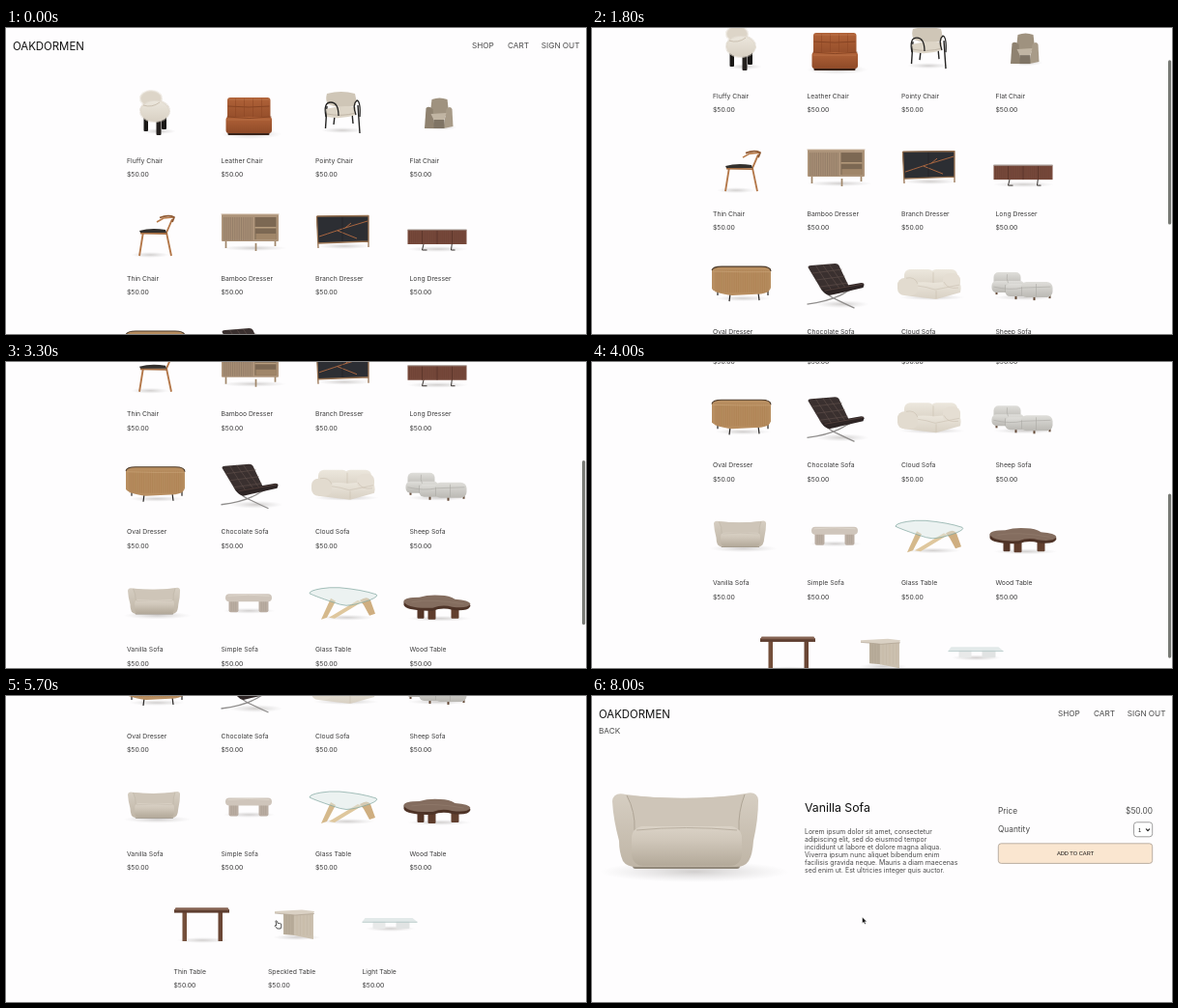
These frames come from a looping animation (600x317 px, 8100 ms). An HTML page:

```html
<!DOCTYPE html>
<html lang="en">
<head>
<meta charset="utf-8">
<title>Furniture shop</title>
<style>
html, body { margin: 0; width: 100%; height: 100%; overflow: hidden; background: #fefdfe; }
svg { display: block; width: 100vw; height: 100vh; }
text { font-family: Inter, sans-serif; fill: #4a4a4a; white-space: pre; }
.logo { font-size: 11.4px; fill: #111; }
.nav { font-size: 8.2px; }
.label { font-size: 6.8px; fill: #3c3c3c; }
.title { font-size: 12.3px; fill: #111; }
.copy { font-size: 6.93px; }
.field { font-size: 8.3px; }
.button { font: 5.7px "Liberation Sans", sans-serif; fill: #111; }
</style>
</head>
<body>
<svg id="stage" viewBox="0 0 600 317">
  <defs>
    <linearGradient id="linen" x2="0" y2="1"><stop stop-color="#d6cec2"/><stop offset="1" stop-color="#bfb5a6"/></linearGradient>
    <linearGradient id="seat" x2="0" y2="1"><stop stop-color="#dad2c6"/><stop offset=".35" stop-color="#d0c7ba"/><stop offset="1" stop-color="#b3a999"/></linearGradient>
    <linearGradient id="hide" x2="0" y2="1"><stop stop-color="#b06238"/><stop offset="1" stop-color="#8f4a28"/></linearGradient>
    <linearGradient id="boucle" x2="0" y2="1"><stop stop-color="#ece7dd"/><stop offset="1" stop-color="#d8d0c3"/></linearGradient>
    <linearGradient id="fleece" x2="0" y2="1"><stop stop-color="#dfdeda"/><stop offset="1" stop-color="#bab8b3"/></linearGradient>
    <radialGradient id="shade"><stop stop-color="#8d8884" stop-opacity=".4"/><stop offset="1" stop-color="#aaa" stop-opacity="0"/></radialGradient>
  </defs>
  <g id="shop"></g>
  <g id="detail"></g>
  <rect id="bar" x="596" width="3.2" height="170.3" rx="1.6" fill="#777974"/>
  <path id="arrow" d="M0 0V6.6L1.6 5.2L2.7 7.6L3.8 7.1L2.8 4.8H4.8Z" fill="#111" stroke="#fff" stroke-width=".5"/>
  <path id="hand" d="M-.6 .2Q.2 -.6 .9 .4L1.8 2.6Q2.5 1.9 3 2.5Q3.8 2 4.2 2.8Q5.2 2.6 5.3 3.8Q5.6 6.4 4.6 8H1Q.2 6.6 -1.4 5.2Q-1.2 4 .4 4.5Z" fill="#fff" stroke="#222" stroke-width=".8"/>
</svg>
<script>
const LOOP = 8100, STEP = 100, OPEN = 7000;
const $ = id => document.getElementById(id);

const fill = (d, color, extra = '') => `<path d="${d}" fill="${color}" ${extra}/>`;
const line = (d, color, width = 1) =>
  `<path d="${d}" fill="none" stroke="${color}" stroke-width="${width}" stroke-linejoin="round"/>`;
const box = (x, y, w, h, color, r = 0, extra = '') =>
  `<rect x="${x}" y="${y}" width="${w}" height="${h}" rx="${r}" fill="${color}" ${extra}/>`;
const oval = (x, y, rx, ry, color, extra = '') =>
  `<ellipse cx="${x}" cy="${y}" rx="${rx}" ry="${ry}" fill="${color}" ${extra}/>`;
const shade = (x, y, rx, ry = 3) => oval(x, y, rx, ry, 'url(#shade)');
const text = (x, y, kind, str, anchor = 'start') =>
  `<text x="${x}" y="${y}" class="${kind}" text-anchor="${anchor}">${str}</text>`;
const slats = (from, to, gap, top, bottom, color, width = .5) => {
  let d = '';
  for (let x = from; x <= to; x += gap) d += `M${x} ${top}V${bottom}`;
  return line(d, color, width);
};

const sofa = shade(106, 182, 98, 11) +
  box(42, 172, 111, 7, '#91887a', 3) +
  fill('M21 109Q22 99 35 102Q65 106 97 106Q130 106 159 101Q171 98 172 108Q172 128 167 150Q166 165 162 171Q158 177 149 177H46Q36 177 32 171Q28 162 28 150Q22 128 21 109Z', 'url(#linen)') +
  fill('M36 103Q97 109 158 102Q152 118 152 137H44Q44 118 36 103Z', '#cec5b8') +
  line('M36 103Q45 120 44 139M158 102Q151 120 152 139', '#afa596', 1) +
  box(41, 135, 114, 41, 'url(#seat)', 12) +
  line('M46 139Q97 134 150 139', '#b0a697', .8);

const glassTop = 'M-6 79Q-6 76 6 74Q14 72.5 25 73Q48 75 63 80Q66 82 56 86Q42 91 32 91.5Q26 91 18 88Q0 82 -6 79Z';

// Each drawing uses coordinates from the left edge of its cell.
const art = {
  'Fluffy Chair': () => shade(33, 107, 18) +
    box(17.5, 92, 4.5, 15, '#191716', 1) + box(36, 92, 5, 13, '#191716', 1) + box(30.5, 94, 5, 17, '#24201e', 1) +
    oval(25, 73, 11, 8, '#ddd5c8', 'stroke="#e8e2d8" stroke-width="2" stroke-dasharray=".6 .5"') +
    oval(29, 86, 15, 11, 'url(#boucle)', 'stroke="#ddd5c9" stroke-width="2" stroke-dasharray=".6 .5"') +
    line('M17 80Q26 83 34 77', '#c3b8a8', .8),
  'Leather Chair': () => shade(31, 110, 32, 5) +
    box(7, 107, 43, 4, '#3a241a', 1) +
    box(6.5, 72, 44.5, 26, 'url(#hide)', 3) + box(5, 92, 47.5, 17, 'url(#hide)', 3) +
    line('M7 81Q29 83 50 81M6 92Q29 95 52 92', '#7f3f20', .8) + slats(15, 44, 9, 73, 92, '#8a4523') +
    line('M8 74H50M6 95H51', '#c27a50', .6),
  'Pointy Chair': () => shade(28, 106, 22) +
    line('M12 81L10.5 104M44 80L46 109M20 91L19 100M38 88L39 99', '#242322', 1.4) +
    fill('M12 68Q27 64 41 68Q43 74 42 80Q27 85 13 79Q10 74 12 68Z', '#cfc6b7') +
    fill('M11 84Q28 79 42 82V90Q27 95 12 92Z', '#ddd5c7') + line('M12 89Q27 92 42 88', '#b5aa9a', .7) +
    line('M11 92Q8 77 16 77Q24 77 24 91M42 90Q38 79 43 75Q47 76 46 92', '#242322', 1.3),
  'Flat Chair': () => shade(31, 103, 18) +
    fill('M23 74Q31 71 39 74L41 91H21Z', '#9f927f') +
    fill('M17 83Q20 80 24 84L26 104H15.5Z', '#8f8270') + fill('M38 84Q42 80 44 84L45 102L35 104Z', '#a89b88') +
    fill('M22 89L38 88L36 95H25Z', '#c1b5a3') + fill('M25 95H36V104H25Z', '#7f7465'),
  'Thin Chair': () => shade(24, 113, 20) +
    line('M17 89L13 114M46 114L41 90L47 76', '#b4784a', 1.9) +
    line('M14 90.5L42 91', '#a56c40', 1.8) + fill('M13 88Q25 84.5 40 87L41 90H14Z', '#33302d') +
    line('M31 79L38 75L48 74', '#b87b4a', 1.6) + line('M34 74.5Q43 71 49 74L47 79', '#8f5a34', 1.8),
  'Bamboo Dresser': () => shade(34, 106, 34) +
    line('M5 98V106M36 101V109M56 97V104', '#a08669', 1.7) +
    box(.5, 71, 59, 28, '#ad947a', 1) + box(35, 74, 22, 23, '#7c6853') + box(35, 84, 22, 1.5, '#b79d7e') +
    box(36, 91, 21, 6, '#a08669') + slats(3, 33, 1.8, 74, 98, '#8a7460', .7) + line('M0 71H60', '#c4ae95', 1),
  'Branch Dresser': () => shade(30, 104, 28) +
    fill('M1 73L55 72V99L3 101Z', '#2c2e33') + line('M1.5 73L55 72.5V105M3 101L55 99M1.5 73L3 106', '#96704f', 1.3) +
    line('M4 94Q22 88 31 85L54 78M23 88L43 96M31 85L37 80', '#b66c42', .9) + line('M28 74V99', '#1c1e21', .5),
  'Long Dresser': () => shade(29, 107, 32) +
    line('M15 100L13 108H18M44 100L43 108H47', '#37312e', 1) +
    box(-2, 87, 61, 15, '#77493b') + slats(0, 58, 2.1, 88, 101, '#683f33', .5) +
    line('M-2 87H59', '#a49a94', 1.2) + slats(13, 45, 15.5, 88, 102, '#4d2c23', .6),
  'Oval Dresser': () => shade(31, 103, 29) +
    line('M18 98L17 106M47 97L48 105M5 95V100M57 95V100', '#262321', 1.2) +
    fill('M-1 74Q0 70 9 70H50Q60 70 60 75V92Q59 97 50 98.5L20 100Q2 98 -1 93Z', '#b88e60') +
    slats(3, 58, 1.8, 74, 97, '#a67b4d') + line('M-1 74Q0 70 9 70H50Q60 70 60 75', '#4d3b2b', 1.1) +
    line('M0 75Q30 76 60 75.5', '#cda87d', .6),
  'Chocolate Sofa': () => shade(36, 109, 28, 4) +
    line('M0 109Q26 106 41 96Q50 91 57 89M17 94Q22 101 32 105Q40 109 49 113', '#8f8d8c', 1.3) +
    fill('M1 71Q1 69 4 69L29 67Q32 67 33 69L43 90L17 96Q14 94 13 91Z', '#3a302f') +
    fill('M15 94L56 87Q59 87 59 89L58 92L23 100Q18 99 15 94Z', '#2e2525') +
    line('M9 69L25 94M16 68L33 92M23 68L39 91M5 77L36 73M9 84L39 80M13 91L42 87', '#62514c', .6) +
    line('M18 95L58 88', '#58453f', .8),
  'Cloud Sofa': () => shade(32, 102, 34) +
    box(3, 73, 31, 20, 'url(#boucle)', 6) + box(30, 73, 28, 19, 'url(#boucle)', 6) +
    fill('M2 88Q20 85 34 87L58 85Q63 88 61 97L36 104L3 100Z', 'url(#boucle)') +
    box(-4, 82, 21, 18, '#e2dbcf', 7) + box(43, 77, 18, 17, '#e5ded3', 7) +
    line('M17 90Q26 91 35 94L60 89M36 95V103M33 76V87M5 82Q14 80 17 88M44 86Q48 94 59 92', '#c9bfb1', .6),
  'Sheep Sofa': () => shade(30, 102, 32) +
    box(0, 95, 2, 4, '#654b38') + box(20, 100, 2, 4, '#654b38') + box(39, 101, 2, 4, '#654b38') + box(55, 99, 2, 4, '#654b38') +
    box(-2, 76, 28, 14, 'url(#fleece)', 5) + box(-4, 85, 34, 12, 'url(#fleece)', 5) +
    box(10, 88, 30, 13, 'url(#fleece)', 5) + box(26, 86, 33, 16, 'url(#fleece)', 6) +
    line('M-2 91Q15 95 28 92L57 91M10 89V97M27 91V100M42 88V101M12 78Q11 83 13 87', '#aaa8a3', .6),
  'Vanilla Sofa': () => `<g transform="translate(-6.5 37.8) scale(.358 .352)">${sofa}</g>`,
  'Simple Sofa': () => shade(29, 97, 27) +
    box(8, 85, 10, 13.5, '#baada2', 2) + box(39, 85, 10, 13.5, '#baada2', 2) +
    slats(11, 15, 2, 87, 97, '#ab9e92') + slats(42, 46, 2, 87, 97, '#ab9e92') +
    box(4.5, 79.5, 48, 8, '#cfc5bb', 4) + line('M7 81.5Q28 79.5 50 81.5', '#e0d8cf', .8),
  'Glass Table': () => shade(33, 104, 28) +
    fill('M6 106L16 84L21 87L12 104Z', '#d5b98c') + fill('M14 104L44 86L48 88L20 105Z', '#dfc79d') +
    fill('M46 86Q54 81 57 86L62 100L56 102L50 91Z', '#cfae80') +
    fill(glassTop, '#dbe8e5', 'fill-opacity=".5"') + line(glassTop, '#7fa59e', .7),
  'Wood Table': () => shade(31, 105, 33) +
    box(8, 93, 7, 12, '#543527', 1) + box(19, 93, 8, 13, '#5e3c2c', 1) + box(43, 92, 8, 13, '#62402f', 1) +
    fill('M-6 88Q-6 84 10 84Q20 81 32 82Q42 82 47 86Q62 87 63 92Q61 98 44 96Q34 93 24 97Q-4 97 -6 91Z', '#4e3327') +
    fill('M-6 87Q-5 83 10 83Q20 80 32 81Q41 81 47 85Q62 86 63 90Q60 95 44 93Q34 90 24 94Q-4 95 -6 87Z', '#846d5f') +
    line('M2 88Q22 84 56 90', '#927c6e', .6),
  'Thin Table': () => shade(30, 105, 27) +
    box(9, 76, 4.5, 30, '#744f3b') + box(46, 76, 4.5, 30, '#6a4635') +
    box(.5, 73, 57, 3.6, '#5d3d2f') + fill('M2 71.3H56L57.5 74H.5Z', '#856353'),
  'Speckled Table': () => shade(30, 102, 25) +
    fill('M16 77H28V100L16 99Z', '#b9ad9b') + fill('M27 77L47 76V104L27 100Z', '#cbc0af') +
    slats(30, 45, 3.5, 79, 100, '#c1b5a3', .5) + slats(19, 26, 3, 79, 99, '#aa9e8c', .5) +
    fill('M7 75L35 73.5L48 75L47 77.5L28 79L7 77Z', '#dad1c4') + line('M7 77L28 79L48 77.5', '#a99d8b', .6),
  'Light Table': () => shade(29, 93, 26) +
    box(11, 85, 13, 8, '#e8e9e9', 1) + box(35, 85, 14, 8, '#e1e3e3', 1) +
    fill('M3 82H52L57 86H0Z', '#dde6e6', 'fill-opacity=".85"') + line('M0 86.3H57', '#b6c9c8', .9)
};

const header = text(7, 22.5, 'logo', 'OAKDORMEN') + text(482, 21.4, 'nav', 'SHOP') +
  text(519, 21.4, 'nav', 'CART') + text(593.5, 21.4, 'nav', 'SIGN OUT', 'end');

$('shop').innerHTML = header + Object.entries(art).map(([name, draw], i) => {
  const row = i >> 2, x = (row === 4 ? 173.5 : 125) + i % 4 * 97.5;
  return `<g transform="translate(${x} ${row * 122})">${draw()}` +
    text(0, 139.6, 'label', name) + text(0, 154.3, 'label', '$50.00') + '</g>';
}).join('');

const copy = [
  'Lorem ipsum dolor sit amet, consectetur',
  'adipiscing elit, sed do eiusmod tempor',
  'incididunt ut labore et dolore magna aliqua.',
  'Viverra ipsum nunc aliquet bibendum enim',
  'facilisis gravida neque. Mauris a diam maecenas',
  'sed enim ut. Est ultricies integer quis auctor.'
];
$('detail').innerHTML = header + text(7, 39, 'nav', 'BACK') + sofa +
  text(220, 119.5, 'title', 'Vanilla Sofa') +
  copy.map((str, i) => text(220, 143.3 + i * 8, 'copy', str)).join('') +
  text(420, 122, 'field', 'Price') + text(580, 122, 'field', '$50.00', 'end') +
  text(420, 141.2, 'field', 'Quantity') +
  box(560.5, 130.8, 19.2, 15, '#fff', 3, 'stroke="#777" stroke-width=".7"') +
  text(565, 140.8, 'button', '1') + line('M573 137.5L575 139.7L577 137.5', '#111', 1.1) +
  box(420.3, 152.8, 159.4, 20.6, '#fae6d0', 3, 'stroke="#a09488" stroke-width=".7"') +
  text(500, 165.1, 'button', 'ADD TO CART', 'middle');

const progress = (t, start, length) => Math.min(1, Math.max(0, (t - start) / length));
const glide = (t, start, length) => 1 - (1 - progress(t, start, length)) ** 2;
const smooth = u => u * u * (3 - 2 * u);

// Four flicks of the trackpad: start, duration, distance.
const flicks = [[0, 1300, 19], [1400, 1300, 92], [2900, 1150, 164], [4050, 1550, 65]];

function show(t) {
  const scroll = flicks.reduce((sum, [start, length, px]) => sum + px * glide(t, start, length), 0);
  const opened = t >= OPEN;
  $('shop').style.display = opened ? 'none' : '';
  $('detail').style.display = opened ? '' : 'none';
  $('shop').setAttribute('transform', `translate(0 ${-scroll})`);
  $('bar').setAttribute('y', scroll * .4965);
  $('bar').style.opacity = t < STEP ? 0 : 1 - progress(t, 5300, 300);

  const away = smooth(progress(t, 5700, 800)), back = smooth(progress(t, 7600, 400));
  const x = 279.5 - 130 * (away - back), y = 233 - 120 * away + 116 * back;
  const pointing = !opened && (t < 5900 || t > 6200);
  for (const [id, on] of [['hand', pointing], ['arrow', !pointing]]) {
    $(id).style.display = on && t >= 5600 ? '' : 'none';
    $(id).setAttribute('transform', `translate(${x} ${y})`);
  }
}

function tick() {
  show(Math.floor(performance.now() % LOOP / STEP) * STEP);
  requestAnimationFrame(tick);
}
tick();
</script>
</body>
</html>
```
